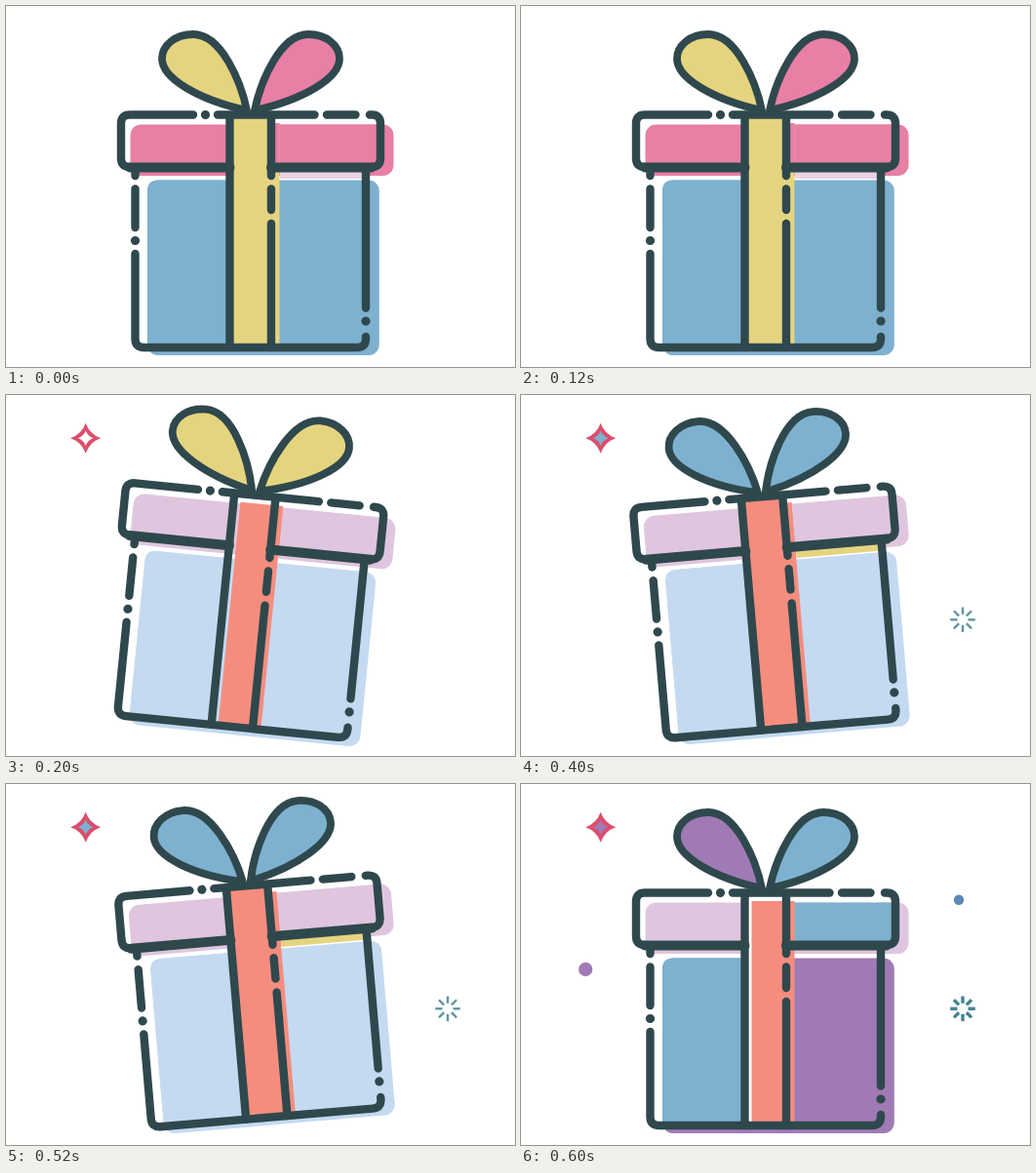
Write an HTML page that moves like this. It is 522 px wide and 370 px high and loops after 0.8 s.

```html
<!DOCTYPE html>
<html lang="en">
<head>
<meta charset="utf-8">
<title>Gift box</title>
<style>
  html, body { margin: 0; width: 100%; height: 100%; overflow: hidden; background: #fff; }
  svg { display: block; width: 100vw; height: 100vh; animation: party 800ms step-end infinite; }

  /* One set of colours and one pose per beat, changed without blending. */
  @keyframes party {
    0%, 100% {
      --pose: none;
      --bowL: #e5d47f; --bowR: #e87fa5;
      --lid: #e87fa5; --patch: #e87fa5; --strip: #ecd3e3;
      --box: #7db1cf; --left: #7db1cf;
      --ribbon: #e5d47f; --gap: #e5d47f; --flap: #e87fa5;
      --core: #fff; --star: 0; --burst: 0; --dots: 0;
    }
    25% {
      --pose: translate(17px, -33.2px) rotate(5.7deg);
      --bowL: #e5d47f; --bowR: #e5d47f;
      --lid: #dfc6de; --patch: #dfc6de; --strip: transparent;
      --box: #c5daf1; --left: #c5daf1;
      --ribbon: #f58d7e; --gap: transparent; --flap: #f58d7e;
      --core: #fff; --star: 1; --burst: 0; --dots: 0;
    }
    50% {
      --pose: translate(-12.4px, 14.6px) rotate(-4.9deg);
      --bowL: #7db1cf; --bowR: #7db1cf;
      --lid: #dfc6de; --patch: #dfc6de; --strip: #e5d47f;
      --box: #c5daf1; --left: #c5daf1;
      --ribbon: #f58d7e; --gap: #f58d7e; --flap: #f58d7e;
      --core: #7db1cf; --star: 1; --burst: .85; --dots: 0;
      --ray: 2.4px;
    }
    75% {
      --pose: none;
      --bowL: #a07ab4; --bowR: #7db1cf;
      --lid: #dfc6de; --patch: #7db1cf; --strip: transparent;
      --box: #a07ab4; --left: #7db1cf;
      --ribbon: #f58d7e; --gap: #fff; --flap: #f58d7e;
      --core: #a07ab4; --star: 1; --burst: 1; --dots: 1;
      --ray: 3.4px;
    }
  }

  #gift { transform: var(--pose); transform-origin: 0 0; }
  .line { fill: none; stroke: #2f484d; stroke-width: 8.4px; stroke-linecap: round; stroke-linejoin: round; }
  .dot { stroke-width: 9.2px; }
  .rim { stroke-width: 10px; }
  .bow { stroke-width: 7.8px; }
  .bow.l { fill: var(--bowL); }
  .bow.r { fill: var(--bowR); }
  .lid { fill: var(--lid); }
  .patch { fill: var(--patch); }
  .strip { fill: var(--strip); }
  .box { fill: var(--box); }
  .left { fill: var(--left); }
  .ribbon { fill: var(--ribbon); }
  .gap { fill: var(--gap); }
  .flap { fill: var(--flap); }
  .core { fill: var(--core); }
  #star { opacity: var(--star); }
  #burst { opacity: var(--burst); stroke: #438391; stroke-width: var(--ray, 3px); }
  #dots { opacity: var(--dots); }
</style>
</head>
<body>
<svg viewBox="0 0 522 370">
  <defs>
    <path id="spark" d="M0-15.5Q4-4 15.500 0Q4 4 0 15.500Q-4 4-15.500 0Q-4-4 0-15.500Z"/>
    <path id="ray" d="M0-5.500V-12.800"/>
    <g id="cross">
      <use href="#ray"/>
      <use href="#ray" transform="rotate(90)"/>
      <use href="#ray" transform="rotate(180)"/>
      <use href="#ray" transform="rotate(270)"/>
    </g>
  </defs>

  <g id="gift">
    <!-- Offset colour blocks -->
    <rect class="lid" x="127.500" y="121.500" width="270" height="52.500" rx="11"/>
    <rect class="strip" x="281" y="170" width="85" height="7"/>
    <rect class="patch" x="280" y="121.500" width="100" height="42"/>
    <rect class="box" x="145" y="178.500" width="237.800" height="179.500" rx="11"/>
    <path class="left" d="M230 178.500H156Q145 178.500 145 189.500V347H230Z"/>
    <rect class="gap" x="230" y="112" width="42" height="236"/>
    <rect class="ribbon" x="236.500" y="120" width="44" height="227"/>
    <rect class="flap" x="272" y="120" width="8.500" height="45"/>

    <!-- Box -->
    <path class="line" d="M132.500 166V174M132.500 187.500V227
      M132.500 254V341Q132.500 350 141.500 350H360Q369 350 369 341V339
      M369 166V309.500"/>
    <!-- Lid -->
    <path class="line" d="M192 111.500H127Q118 111.500 118 120.500V156Q118 165 127 165
      M217 111.500H316.500M329 111.500H358.500
      M373 111.500H375Q384 111.500 384 120.500V156Q384 165 375 165"/>
    <path class="line rim" d="M127 165.500H229.500M272 165.500H375"/>
    <path class="line dot" d="M204.500 111.500h.01M132.500 240.500h.01M369 323h.01"/>
    <!-- Ribbon -->
    <path class="line" d="M229.500 112V350M272 112V174M272 187.500V209M272 223V350"/>
    <!-- Bow -->
    <path class="line bow l" style="fill:var(--bowL)" d="M247 107C241 78 221 29 192 29C174 29 160 40 160 54C160 74 197 96 247 107Z"/>
    <path class="line bow r" style="fill:var(--bowR)" d="M255 107C261 78 281 29 310 29C328 29 342 40 342 54C342 74 305 96 255 107Z"/>
  </g>

  <g id="star" transform="translate(81.700 44.300)">
    <use href="#spark" fill="#dc4e6c"/>
    <use href="#spark" class="core" transform="scale(.5)"/>
  </g>
  <g id="burst" transform="translate(453 230.300)">
    <use href="#cross"/>
    <use href="#cross" transform="rotate(45)"/>
  </g>
  <g id="dots">
    <circle cx="449" cy="118.800" r="5.200" fill="#5b88b5"/>
    <circle cx="66.200" cy="190" r="7.200" fill="#a07ab4"/>
  </g>
</svg>
</body>
</html>
```
